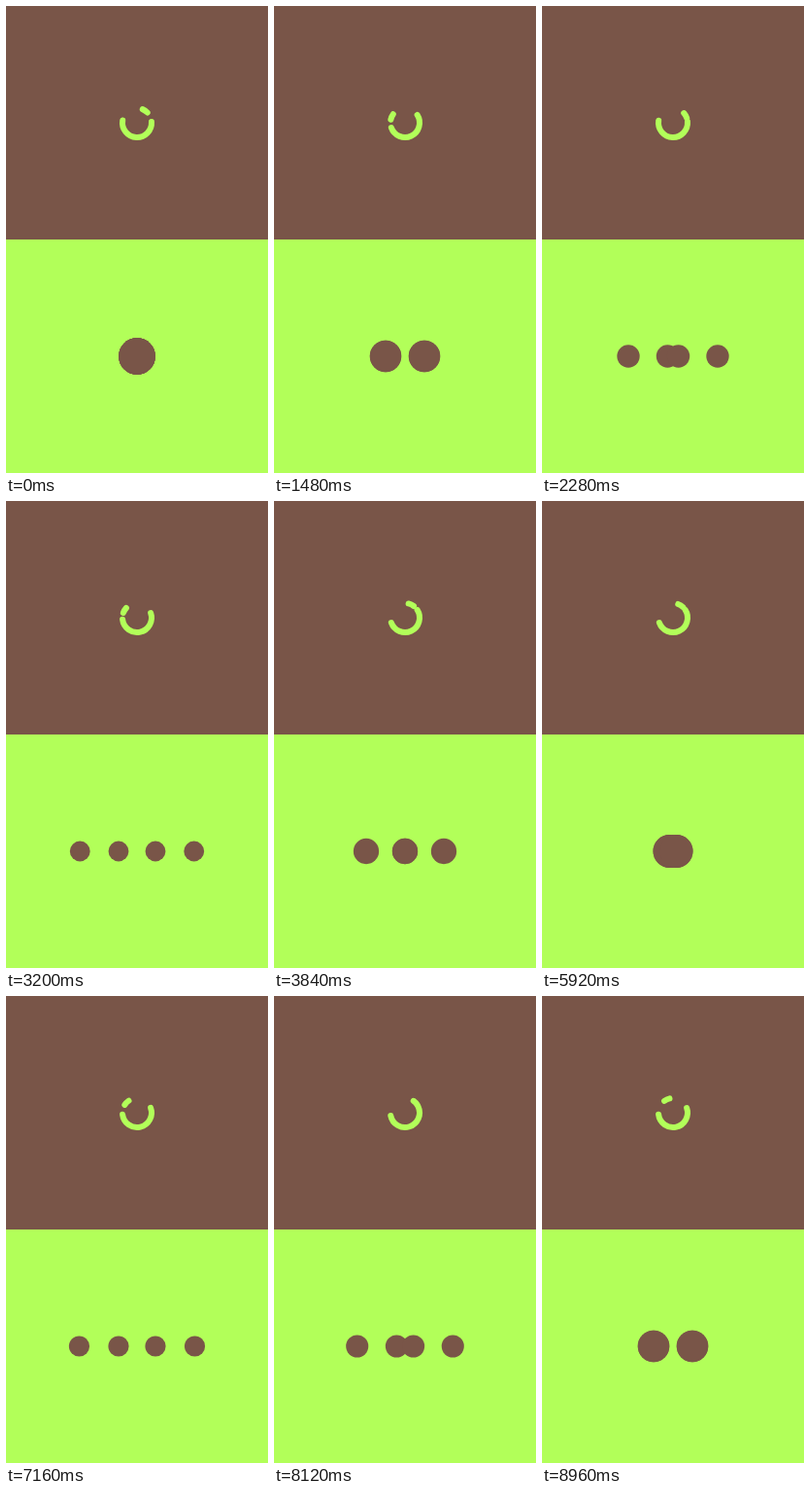
These frames come from a looping animation (270 px wide and 480 px high, 9 s). An HTML page:

```html
<!DOCTYPE html>
<html lang="en">
<head>
<meta charset="utf-8">
<title>Two loaders</title>
<style>
  html, body { margin: 0; width: 100%; height: 100%; overflow: hidden; background: #795548; }
  svg { display: block; width: 100vw; height: 100vh; }
  .ring path { fill: none; stroke: #b2ff59; stroke-width: 6; stroke-linecap: round; }
</style>
</head>
<body>
<svg viewBox="0 0 270 480" preserveAspectRatio="none">
  <rect width="270" height="240" fill="#795548"/>
  <rect y="240" width="270" height="240" fill="#b2ff59"/>
  <g class="ring" transform="translate(135 120)">
    <path id="bowl"/>
    <path id="dash"/>
  </g>
  <g id="dots" transform="translate(135 360)" fill="#795548">
    <circle/><circle/><circle/><circle/>
  </g>
</svg>
<script>
const LOOP = 9000, HOLD = 520;
const SWING = 2040, SWING_START = 8960 % SWING;
const BREATH = 4590, BREATH_START = 625;
const RADIUS = 15, BOWL_HALF = 96.5, DASH_HALF = 11.5;

// Swing poses: time, dash angle, bowl angle (degrees, counter-clockwise)
const poses = [
  [0, 115, 283], [240, 136, 283.3], [360, 149, 283], [520, 158, 291],
  [680, 156, 296], [1040, 58, 296], [1480, 30, 268], [1720, 40, 266],
  [1760, 56, 267]
];

const bowl = document.getElementById('bowl');
const dash = document.getElementById('dash');
const dots = [...document.getElementById('dots').children];

const mod = (a, n) => ((a % n) + n) % n;

function smooth(a, b, x) {
  const u = Math.min(1, Math.max(0, (x - a) / (b - a)));
  return u * u * (3 - 2 * u);
}

function arc(path, mid, half) {
  const point = deg => {
    const a = deg * Math.PI / 180;
    return `${(RADIUS * Math.cos(a)).toFixed(3)} ${(-RADIUS * Math.sin(a)).toFixed(3)}`;
  };
  path.setAttribute('d',
    `M${point(mid - half)}A${RADIUS} ${RADIUS} 0 ${half > 90 ? 1 : 0} 0 ${point(mid + half)}`);
}

// Periodic monotone curve through the poses
function poseAt(p, k) {
  const n = poses.length;
  const key = i => {
    const turn = Math.floor(i / n), q = poses[mod(i, n)];
    return [q[0] + turn * SWING, q[k]];
  };
  const slope = i => {
    const a = key(i), b = key(i + 1);
    return (b[1] - a[1]) / (b[0] - a[0]);
  };
  const tangent = i => {
    const l = slope(i - 1), r = slope(i);
    return l * r > 0 ? 2 * l * r / (l + r) : 0;
  };
  let i = n - 1;
  while (poses[i][0] > p) i--;
  const a = key(i), b = key(i + 1), w = b[0] - a[0], u = (p - a[0]) / w;
  return a[1] + (b[1] - a[1]) * u * u * (3 - 2 * u)
    + w * u * (1 - u) * (tangent(i) * (1 - u) - tangent(i + 1) * u);
}

function drawRing(t) {
  const p = mod(t - SWING_START, SWING);
  arc(dash, poseAt(p, 1), DASH_HALF);
  arc(bowl, poseAt(p, 2), BOWL_HALF);
}

// One dot splits into two, three and four, then joins again
function drawDots(t) {
  const c = Math.cos(2 * Math.PI * (t - BREATH_START) / BREATH);
  const x = (1 - c) / 2, r = 14.5 + 4.4 * c;
  const two = smooth(0.19, 0.285, x);
  const three = smooth(0.47, 0.61, x);
  const four = smooth(0.77, 0.91, x);
  const inner = 20 * two - 20 * three + 19 * four;
  const outer = 20 * two + 20 * three + 20.5 * four - 40 * Math.max(0, x - 0.92);
  [-outer, -inner, inner, outer].forEach((cx, i) => {
    dots[i].setAttribute('cx', cx.toFixed(3));
    dots[i].setAttribute('r', r.toFixed(3));
  });
}

let start;
function frame(now) {
  if (start === undefined) start = now;
  const t = Math.max(HOLD, mod(now - start, LOOP));
  drawRing(t);
  drawDots(t);
  requestAnimationFrame(frame);
}
requestAnimationFrame(frame);
</script>
</body>
</html>
```
